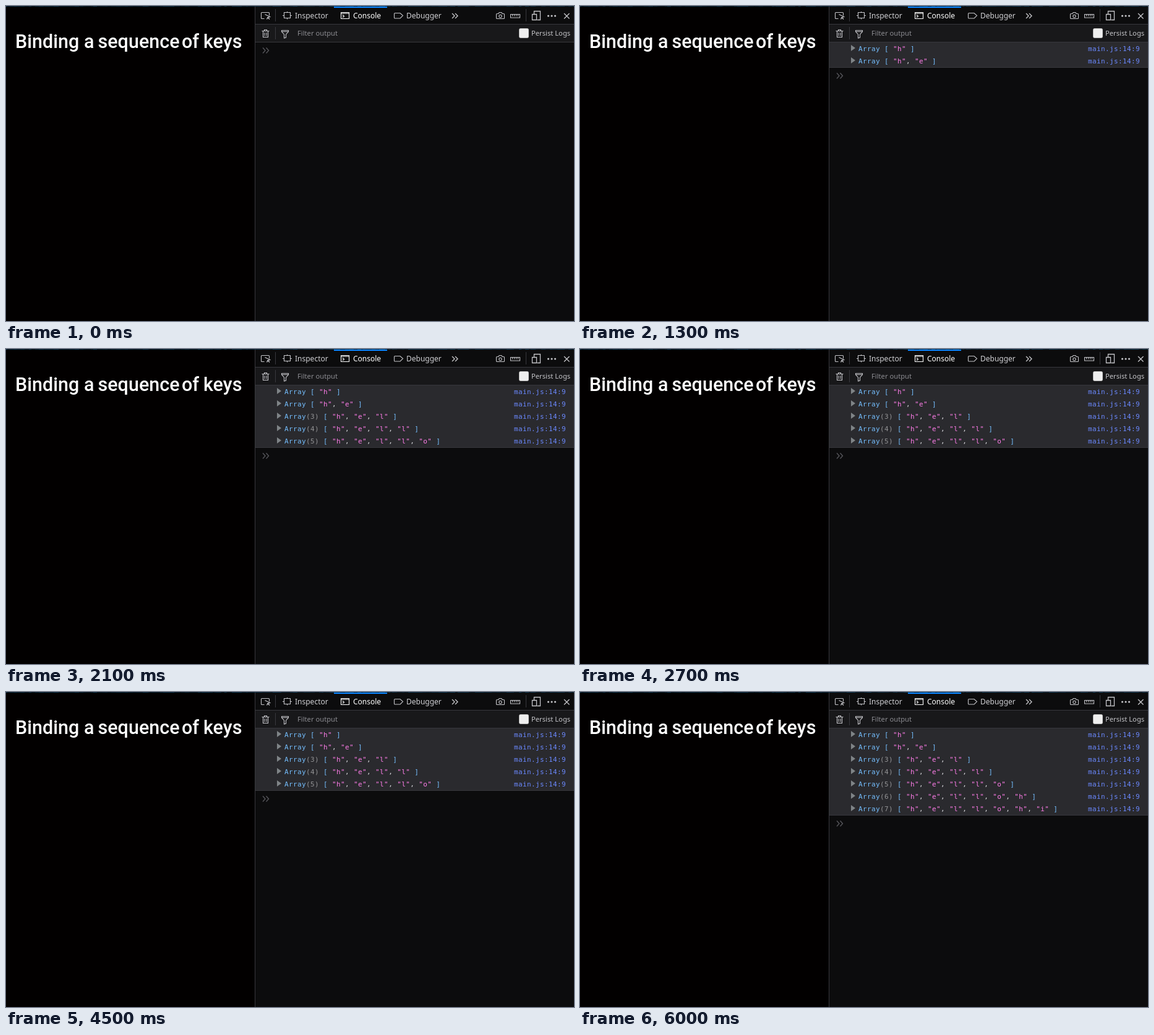
These frames come from a looping animation (918 by 510 pixels, 8000 ms). An HTML page:

```html
<!DOCTYPE html>
<html lang="en">
<head>
<meta charset="utf-8">
<title>Binding a sequence of keys</title>
<style>
  html, body { margin: 0; width: 100%; height: 100%; overflow: hidden; background: #020000; }
  svg { display: block; }
  text { white-space: pre; }
  .title { font: 500 30.5px Roboto, sans-serif; fill: #fff; }
  .tab { font: 12px "Noto Sans", sans-serif; fill: #d0d0d4; }
  .small { font: 11.2px "Noto Sans", sans-serif; fill: #c4c4c8; }
  .log { font: 11px "DejaVu Sans Mono", monospace; letter-spacing: .38px; fill: #d7d7db; }
  .name { fill: #75bfff; }
  .count { fill: #939395; }
  .string { fill: #ff7de9; }
  .link { fill: #6b89ff; }
  .icons { fill: none; stroke: #c4c4c8; stroke-width: 1.1; }
</style>
</head>
<body>
<svg width="918" height="510" viewBox="0 0 918 510">
  <g class="title">
    <text x="15" y="68">Binding</text><text x="126" y="68">a</text>
    <text x="148.5" y="68">sequence</text><text x="284" y="68">of</text>
    <text x="319" y="68">keys</text>
  </g>

  <!-- panel and toolbars -->
  <path fill="#0c0c0d" d="M403 0h515v510H403z"/>
  <path fill="#18181a" d="M403 30h515v28H403z"/>
  <path fill="#38383d" d="M402 0h1v510h-1zM403 29h515v1H403zM403 58h515v1H403zM435 5h1v20h-1zM435 34h1v20h-1zM840 5h1v20h-1z"/>
  <g id="strip"></g>
  <path fill="#0a84ff" d="M530 1h86v2h-86z"/>

  <text class="tab" x="467" y="20">Inspector</text>
  <text class="tab" x="561" y="20" style="fill:#fff">Console</text>
  <text class="tab" x="647" y="20">Debugger</text>
  <text class="small" x="471" y="48" style="fill:#8b8b90">Filter output</text>
  <text class="small" x="849" y="48">Persist Logs</text>
  <rect x="829.5" y="36.500" width="15" height="15" rx="2" fill="#efefef" stroke="#bdbdbd"/>

  <g class="icons">
    <path d="M417.500 20.500h-4q-1 0-1-1v-8q0-1 1-1h11q1 0 1 1v4"/>
    <path d="M418.500 13.500l8 4-3.500 1 3 3m-3-3l-1.500 3z" stroke-width="1.300"/>
    <path d="M449.500 10.500h10v9h-10zM447 15.500h2.500M459.500 15.500h2.500M454.500 9v1.500M454.500 19.500v2"/>
    <path d="M541.500 10.500h13v10h-13zM541.500 12h13M544 14.500l2.500 2-2.500 2" stroke="#fff"/>
    <path d="M628.500 11.500h8.500l4.500 4-4.500 4.500h-8.500q-1 0-1-1v-6.500q0-1 1-1z"/>
    <path d="M721 12l4 4-4 4M726 12l4 4-4 4" stroke-width="1.400"/>
    <path d="M793.500 12.500h2.500l1-2h4l1 2h2.500q1 0 1 1v6q0 1-1 1h-11q-1 0-1-1v-6q0-1 1-1z"/>
    <circle cx="799" cy="16.500" r="2.200"/>
    <path d="M815.500 13.500h15v5.500h-15zM818.500 14v2.500M821.500 14v2.500M824.500 14v2.500M827.500 14v2.500"/>
    <path d="M853.500 13v-4.500h10v14h-5M850.500 13.500h7v9h-7z" stroke-width="1.300"/>
    <path d="M876.500 16h.01M882 16h.01M887.500 16h.01" stroke-width="3.200" stroke-linecap="round"/>
    <path d="M902 12l8.500 8.500M910.500 12l-8.500 8.500" stroke-width="1.400"/>
    <path d="M413.500 40.500h12M417.500 40v-1.500h4v1.500M415.500 41v9.500h8v-9.500M418 43v5.500M421 43v5.500"/>
    <path d="M445.500 39.500h11v2l-4 4.500v5l-3 1v-6l-4-4.500zM446 41.500h10"/>
  </g>

  <g id="rows"></g>
  <path id="prompt" d="M415 67.500l4 4.500-4 4.500M420.500 67.500l4 4.500-4 4.500" fill="none" stroke="#55555a" stroke-width="1.400"/>
</svg>
<script>
const DURATION = 8000, ROW = 20;
const letters = [..."hellohi"];
const times = [900, 1000, 1800, 1800, 2100, 5500, 6000];
const rows = document.getElementById("rows");
const prompt = document.getElementById("prompt");

const span = (cls, text) => `<tspan class="${cls}">${text}</tspan>`;

function logRow(i) {
  const n = i + 1, y = 59 + i * ROW;
  const items = letters.slice(0, n).map(c => span("string", `"${c}"`)).join(", ");
  const count = n > 2 ? span("count", `(${n})`) : "";
  return `<path fill="#2a2a2e" d="M403 ${y}h515v20H403z"/>
    <path fill="#7f8487" d="M438 ${y + 4}l7 5-7 5z"/>
    <text class="log" x="450" y="${y + 14}">${span("name", "Array")}${count}${span("name", " [ ")}${items}${span("name", " ]")}</text>
    <text class="log link" x="821" y="${y + 14}">main.js:14:9</text>`;
}

// sliver of desktop along the top edge
let seed = 7, strip = "";
const random = () => (seed = seed * 16807 % 2147483647) / 2147483647;
for (let x = 0; x < 918;) {
  const w = 2 + Math.floor(random() * 7), light = 10 + random() * 12;
  strip += `<path fill="hsl(204 65% ${light}%)" d="M${x} 0h${w}v1h-${w}z"/>`;
  x += w;
}
document.getElementById("strip").innerHTML = strip;

let shown = -1;
function draw() {
  const t = performance.now() % DURATION;
  const n = times.filter(start => t >= start).length;
  if (n !== shown) {
    shown = n;
    const border = n ? `<path fill="#38383d" d="M403 ${59 + n * ROW}h515v1H403z"/>` : "";
    rows.innerHTML = letters.slice(0, n).map((_, i) => logRow(i)).join("") + border;
    prompt.setAttribute("transform", `translate(0 ${n ? n * ROW + 1 : 0})`);
  }
  requestAnimationFrame(draw);
}
draw();
</script>
</body>
</html>
```
